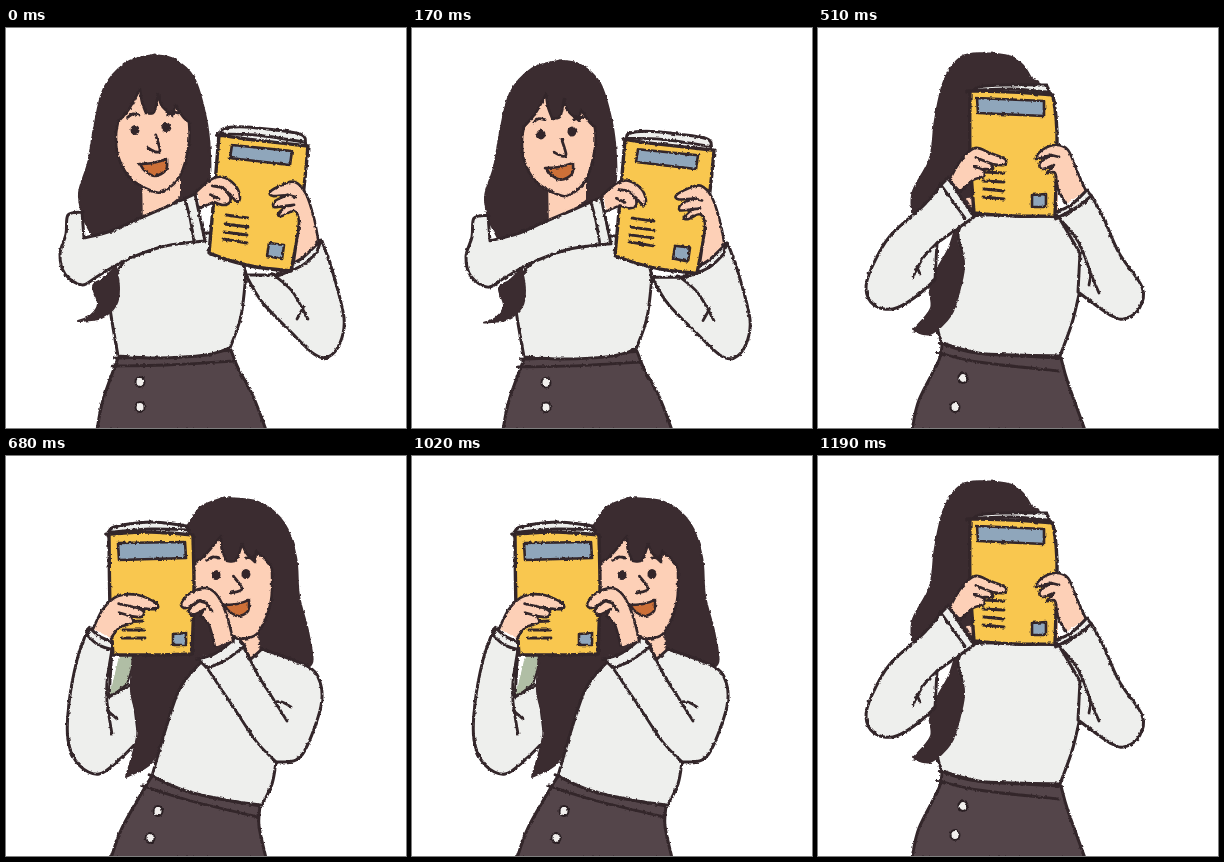
Recreate the animation shown at these times as an HTML page. Size 400 by 400 pixels, loop 1360 ms.

```html
<!DOCTYPE html>
<html lang="en">
<head>
<meta charset="utf-8">
<title>Peeking from behind a book</title>
<style>
html, body { margin: 0; width: 100%; height: 100%; overflow: hidden; background: #fff; }
svg { display: block; width: 100%; height: 100%; }
path { stroke: #33262a; stroke-width: 3; stroke-linejoin: round; stroke-linecap: round; }
.hair { fill: #3b2c30; stroke: #3b2c30; stroke-width: 2; }
.skin { fill: #fdd0b7; stroke-width: 2.6; }
.neck { fill: #fdd0b7; stroke: none; }
.shirt { fill: #eeefed; }
.skirt { fill: #54454a; }
.book { fill: #f9c74f; stroke-width: 3.4; }
.tag { fill: #8fa6bb; stroke-width: 2.6; }
.lining { fill: #b0bea5; stroke-width: 2; }
.mouth { fill: #cd7038; stroke-width: 2.6; }
.line { fill: none; stroke-width: 2.8; }
.eye { fill: #33262a; }
.button { fill: #f1efed; stroke: #2b2024; stroke-width: 2; }
</style>
</head>
<body>
<svg id="stage" viewBox="0 0 400 400">
  <filter id="rough" x="0" y="0" width="400" height="400" filterUnits="userSpaceOnUse" color-interpolation-filters="sRGB">
    <feTurbulence type="fractalNoise" baseFrequency=".3" numOctaves="2" seed="4"/>
    <feDisplacementMap in="SourceGraphic" scale="3" xChannelSelector="R" yChannelSelector="G"/>
  </filter>
</svg>
<script>
// One shape per row: class, then points. A slash marks a sharp corner between smooth runs.
const poses = {
right: `
hair 147,27 120,35 98,60 88,100 82,135 73,165 77,190 / 95,225 / 140,205 / 190,166 203,152 204,125 200,90 188,50 168,31 147,27
neck 136,150 / 137,190 / 160,180 / 174,168 / 174,145
skin 112,94 123,81 134,61 / 136,74 140,85 / 148,84 152,66 / 156,78 167,88 / 169,77 / 178,90 183,94 / 183,116 174,148 158,163 146,163 124,150 112,128 110,108 112,94
skirt 112,330 160,328 225,322 / 232,340 247,368 260,402 / 91,402 / 97,372 112,330
line 110,338 160,337 229,333
shirt 116,236 104,258 104,280 112,328 / 150,330 200,327 224,320 / 235,288 240,246 / 230,205 / 150,205
shirt 240,247 256,274 285,304 308,326 322,329 334,315 338,290 327,245 316,213 / 298,232 270,247 / 240,247
line 268,247 286,263 302,291
line 297,280 291,291
hair 110,238 98,250 87,258 92,276 84,288 72,293 / 95,290 110,277 113,260 110,238
shirt 76,184 62,187 60,206 54,226 59,246 76,257 92,248 118,233 155,219 188,214 / 199,213 / 189,166 / 160,179 132,191 105,203 78,210
line 179,171 184,190 188,214
skin 275,245 300,231 312,220 / 307,200 / 288,222 / 280,237
shirt 274,247 297,237 311,224 / 315,212 / 295,231 277,239
shirt 215,108 / 217,101 240,99 290,105 299,110 / 300,120
line 217,106 250,107 298,114
book 213,107 240,111 302,118 / 299,150 293,200 285,243 / 250,239 222,232 203,225 / 207,180 213,107
tag 226,117 / 286,123 / 284,137 / 224,130
tag 263,215 / 278,217 / 276,231 / 261,228
line 220,187 / 242,190
line 219,196 / 242,199
line 218,204 / 241,207
line 217,211 / 241,215
skin 191,163 204,152 216,149 229,157 234,169 231,174 224,166 / 224,174 217,177 208,174 / 194,180
line 207,158 217,160 224,167
line 205,167 213,171
skin 312,211 308,190 300,166 289,154 276,157 264,164 267,168 282,167 / 269,173 268,179 280,178 / 272,186 276,188 288,183 293,194 290,218 288,232
line 282,167 290,169
line 280,178 288,177
eye o 129,102
eye o 160,99
line 122,89 127,86 133,87
line 162,87 167,84 172,85
line 150,108 154,122 150,124 142,120
mouth 134,136 147,135 161,131 / 160,142 149,148 139,143 134,136
button o 134,354
button o 134,379`,
peekRight: `
hair 158,12 130,17 109,35 101,62 97,95 88,122 79,153 80,185 85,210 / 150,190 / 215,80 214,52 200,28 180,15 158,12
neck 142,140 / 150,170 / 184,182 / 184,140
skin 123,84 136,70 150,47 / 149,60 154,74 / 162,72 167,58 / 172,70 181,76 / 186,76 / 186,150 / 170,150 145,143 126,123 123,100 123,84
skirt 114,323 150,328 235,320 / 247,350 262,402 / 95,402 / 101,370 114,335 114,323
line 114,333 160,334 238,331
shirt 118,222 112,255 102,285 110,324 / 140,327 190,325 234,321 / 243,290 255,242 / 261,203 / 235,192 175,194
shirt 255,245 268,262 290,284 318,298 334,290 340,274 324,235 299,181 / 278,197 259,207 / 255,245
line 265,214 281,235 301,261
line 294,250 290,259
hair 118,222 97,248 101,278 93,307 / 107,297 119,270 122,245 118,222
shirt 81,177 66,187 54,215 50,239 56,256 70,261 94,250 125,220 166,198 / 178,194 / 162,146 / 153,151 127,170 99,190 80,208
line 154,150 160,169 167,198
shirt 184,71 / 190,61 225,58 264,63 / 266,74
line 189,66 225,65 265,70
book 184,67 225,69 270,73 / 271,110 268,198 / 230,198 185,191 / 184,130 184,67
tag 193,79 / 258,82 / 257,97 / 192,93
tag 246,174 / 258,174 / 257,187 / 246,186
line 199,153 / 220,153
line 198,161 / 219,162
line 196,170 / 219,171
line 195,178 / 218,181
skin 163,148 174,130 189,121 205,126 222,133 223,140 210,138 / 212,145 200,142 / 200,149 188,151 175,161
line 195,129 211,138
line 191,138 201,143
skin 292,178 284,149 278,132 267,125 251,132 250,138 264,136 / 253,143 255,149 266,145 / 260,152 268,155 269,175 267,193
line 264,136 272,139
shirt 259,205 281,194 299,180 / 295,173 / 276,189 258,197
eye o 141,90
eye o 172,88
line 131,78 137,74 144,75
line 171,74 177,73
line 157,87 159,97 165,105 154,108
mouth 147,120 159,121 173,117 / 170,127 160,131 151,127 147,120
button o 137,354
button o 134,379`,
front: `
hair 166,25 143,29 126,53 117,92 112,130 95,163 94,184 / 150,200 / 216,70 213,50 196,30 166,25
skirt 124,316 160,325 243,330 / 250,355 267,402 / 94,402 / 101,372 121,332 124,316
line 122,325 160,334 241,343
shirt 147,188 140,207 145,235 134,271 120,297 124,315 / 160,325 200,327 242,328 / 254,295 262,262 / 262,225 242,189 / 190,186
neck 148,170 / 158,186 / 240,187 / 240,165
hair 140,189 131,220 112,255 113,280 95,302 / 112,306 133,287 142,260 146,235 138,209 148,189
shirt 123,157 105,178 72,208 54,239 48,261 56,277 75,281 96,270 117,252 / 119,215 / 156,189 / 130,150
line 123,157 133,171 147,190
line 119,215 105,230 95,249
line 99,239 102,246
shirt 240,190 / 260,179 273,167 / 286,191 301,225 324,259 322,279 309,290 294,288 260,264 / 262,225 / 243,193
line 244,193 261,215 273,246 281,265
line 273,246 271,257
shirt 153,66 / 161,59 190,57 229,57 / 232,66
line 160,62 195,61 230,64
book 152,63 195,64 235,67 / 239,105 237,188 / 195,188 156,185 / 152,125 152,63
tag 159,70 / 226,73 / 226,88 / 160,85
tag 214,167 / 228,166 / 228,179 / 214,179
line 166,144 / 186,145
line 165,153 / 186,154
line 166,161 / 186,163
line 165,169 / 186,171
skin 132,151 143,132 157,120 172,125 187,131 186,137 173,136 / 175,141 166,141 / 166,148 155,152 143,163
line 159,130 174,136
line 157,139 166,142
skin 268,163 259,143 250,122 238,117 224,122 218,131 233,127 / 222,135 224,141 236,137 / 229,145 237,145 240,161 248,176
line 233,127 241,129
shirt 239,190 259,179 273,168 / 269,162 / 253,177 238,184
button o 145,350
button o 137,379`,
peekLeft: `
hair 217,42 195,51 180,72 / 180,200 / 260,195 / 303,210 303,180 293,140 290,101 278,67 252,46 217,42
neck 229,165 / 232,187 / 244,202 / 254,197 / 250,160
skin 188,108 200,98 215,80 / 216,94 221,105 / 230,104 236,88 / 241,98 249,106 / 250,95 / 262,106 266,113 / 265,145 254,174 242,182 228,180 205,160 188,140
lining 115,192 / 131,197 / 121,228 / 103,242
shirt 81,175 71,204 63,247 62,284 73,309 93,318 114,303 133,284 / 126,228 / 103,241 / 106,193
line 106,193 101,225 101,246 106,278
line 102,255 111,263
hair 127,198 125,235 132,273 120,321 / 146,306 162,270 176,235 202,202 / 160,190
skirt 146,320 184,336 254,350 / 253,370 260,402 / 105,402 / 116,372 138,333 146,320
line 140,331 185,345 252,361
shirt 196,205 174,232 159,275 146,320 / 180,335 225,345 256,349 / 266,328 270,306 / 290,304 302,288 315,250 314,226 301,210 256,193 / 245,203 / 235,188
line 201,212 226,249 250,285 271,307
line 238,191 252,219 266,241 281,265
line 269,246 276,246 285,251
shirt 192,203 210,197 231,181 / 239,190 / 218,205 201,212
shirt 102,80 / 108,71 145,66 181,70 / 184,80
line 105,76 145,73 183,74
book 103,78 145,76 187,79 / 188,135 186,198 / 150,199 107,199 / 104,150 103,78
tag 112,87 / 179,86 / 180,102 / 113,104
tag 167,178 / 180,177 / 180,189 / 167,189
line 117,166 / 137,165
line 117,174 / 138,174
line 116,182 / 139,182
skin 87,173 97,153 112,140 132,139 150,147 150,153 132,152 / 138,156 135,161 124,160 / 126,167 114,171 105,182
line 114,148 132,152
line 114,157 125,160
shirt 84,172 93,180 106,186 / 105,193 91,188 81,179
skin 227,184 221,160 211,139 199,132 183,138 175,148 180,152 193,145 / 183,154 187,159 199,153 / 195,160 203,169 209,191
line 193,145 200,147 / 206,155
eye o 210,119
eye o 240,118
line 201,104 207,101 213,102
line 241,102 248,101
line 228,121 236,133 225,137
mouth 218,149 231,148 243,144 / 242,155 233,160 224,156 218,149
button o 152,355
button o 144,382`,
left: `
hair 245,48 220,56 204,78 196,112 190,155 184,200 / 220,240 / 322,236 318,180 310,135 306,98 294,67 273,51 245,48
neck 229,165 / 228,209 / 243,224 / 275,219 / 273,165
line 229,177 / 227,208
line 273,176 / 275,219
skin 214,117 228,108 243,88 / 243,101 249,112 / 257,109 261,95 / 266,105 274,109 / 276,98 / 286,112 288,125 / 284,154 270,179 250,187 230,176 216,153 213,132 214,117
lining 114,230 / 142,245 / 131,262 / 120,285
shirt 80,215 79,246 88,285 102,326 119,345 136,337 154,321 / 146,260 / 120,280 / 117,252
line 117,254 118,278 127,315
line 122,296 134,305
hair 146,240 139,275 144,295 134,321 / 153,323 166,290 190,253 / 190,235
skirt 151,324 195,347 265,367 / 263,385 265,402 / 97,402 / 119,362 151,324
line 145,333 190,356 263,375
shirt 192,251 170,285 151,324 / 185,343 225,355 268,363 / 273,345 275,328 / 290,332 305,323 322,300 333,268 335,240 319,231 275,219 / 243,224 / 225,210
line 192,247 216,274 241,302 275,329
line 230,216 253,241 272,257 290,271
line 277,264 284,265 292,263
shirt 99,130 / 105,120 140,112 179,110 / 185,121
line 103,125 140,119 181,116
book 100,128 140,122 186,116 / 191,160 200,241 / 160,244 119,247 / 108,190 100,128
tag 110,135 / 179,126 / 181,142 / 113,151
tag 179,224 / 191,221 / 192,234 / 181,236
line 125,206 / 144,203
line 124,214 / 145,213
line 124,223 / 146,222
line 126,231 / 147,231
skin 83,213 94,194 107,179 124,180 140,188 139,194 124,191 / 129,198 117,198 / 118,205 108,210 104,229
line 108,187 124,191
line 108,195 118,198
shirt 82,210 97,227 117,246 / 117,256 97,239 79,217
skin 218,210 211,191 200,172 184,168 170,178 167,187 184,180 / 172,191 176,195 190,188 / 183,196 192,200 199,214 204,226
line 184,180 194,182
shirt 187,240 205,229 222,208 / 230,216 / 213,233 195,247
eye o 234,124
eye o 266,122
line 228,109 234,106 240,107
line 263,107 270,104 275,107
line 252,125 257,141 248,146
mouth 236,155 250,154 264,151 / 262,163 251,168 241,164 236,155
button o 152,352
button o 136,383`
};
const sequence = ["right", "rightLow", "peekRight", "front", "peekLeft", "left", "peekLeft", "front"];
const HOLD = 170;
const stage = document.getElementById("stage");

// Smooth curve through the points of one run.
function spline(points) {
  const at = i => points[Math.max(0, Math.min(points.length - 1, i))];
  const handle = (i, sign) => [0, 1].map(k => at(i)[k] + sign * (at(i + 1)[k] - at(i - 1)[k]) / 6);
  return points.slice(1).map((p, i) => `C${[handle(i, 1), handle(i + 1, -1), p].join(" ")}`).join("");
}

function outline(text) {
  const runs = text.split(" / ").map(run => run.split(" ").map(p => p.split(",").map(Number)));
  let last = runs[0][0], d = "M" + last;
  for (const run of runs) {
    d += spline([last, ...run]);
    last = run.at(-1);
  }
  return d;
}

function dot(center, r) {
  const [x, y] = center.split(",").map(Number);
  return `M${x - r} ${y}a${r} ${r + .5} 0 1 1 ${2 * r} 0a${r} ${r + .5} 0 1 1 ${-2 * r} 0Z`;
}

function toPath(row) {
  const [, cls, text] = row.match(/^(\w+) (.*)$/);
  let d;
  if (text.startsWith("o ")) d = dot(text.slice(2), cls === "eye" ? 3 : 4.5);
  else d = outline(text) + (/line|skin|lining/.test(cls) ? "" : "Z");
  return `<path class="${cls}" d="${d}"/>`;
}

function addPose(rows, transform = "") {
  const group = document.createElementNS("http://www.w3.org/2000/svg", "g");
  group.setAttribute("filter", "url(#rough)");
  group.innerHTML = `<g transform="${transform}">${rows.trim().split("\n").map(toPath).join("")}</g>`;
  return stage.appendChild(group);
}

const groups = {};
for (const name in poses) groups[name] = addPose(poses[name]);
groups.rightLow = addPose(poses.right, "translate(0 6) scale(1 .985)");

function draw() {
  const current = sequence[Math.floor(performance.now() / HOLD) % sequence.length];
  for (const name in groups) groups[name].style.display = name === current ? "" : "none";
  requestAnimationFrame(draw);
}
draw();
</script>
</body>
</html>
```
